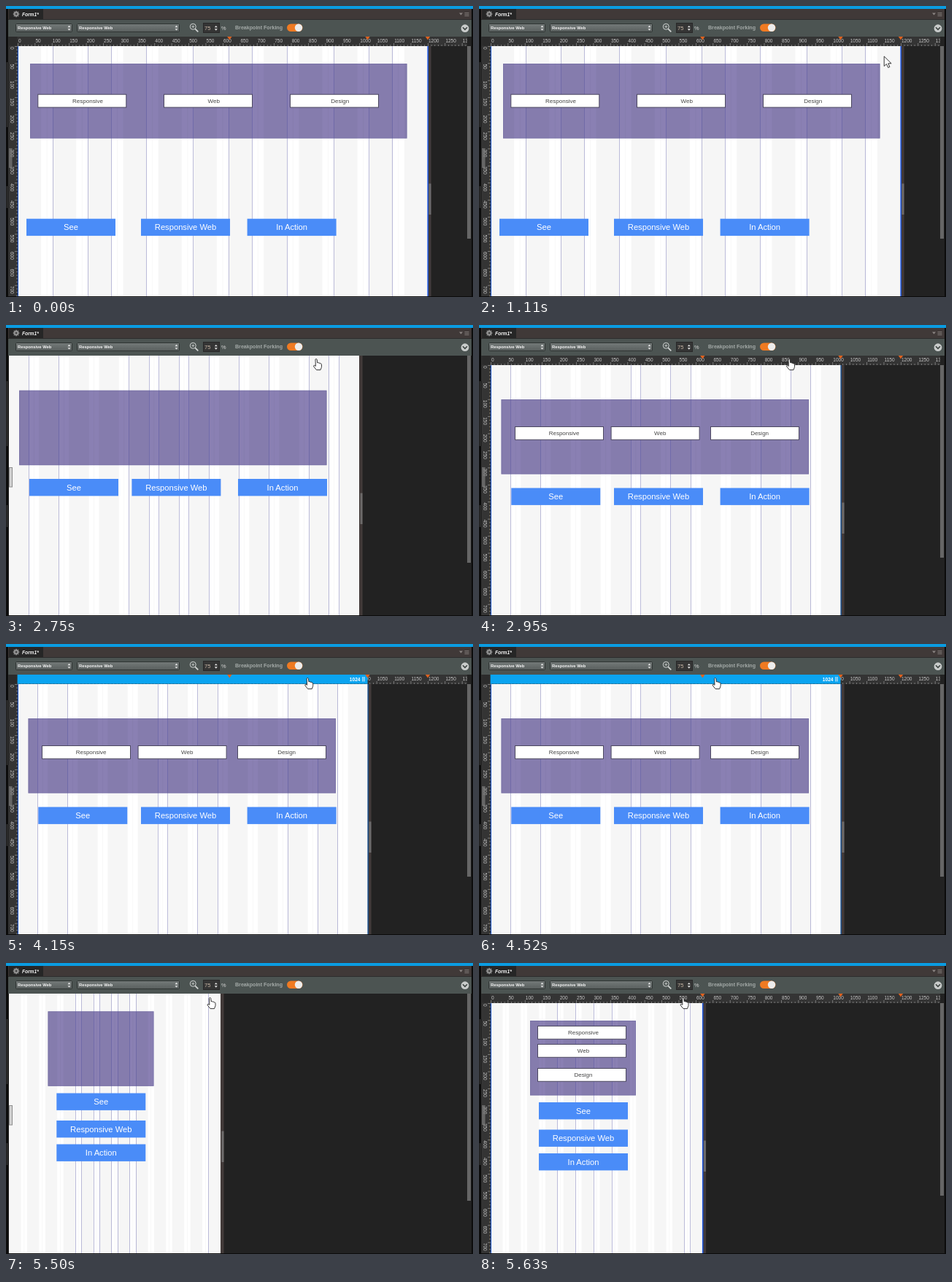
Recreate the animation shown at these times as an HTML page. Size 640x399 px, loop 6.23 s.

```html
<!DOCTYPE html>
<html lang="en">
<head>
<meta charset="utf-8">
<title>Responsive form designer</title>
<style>
html, body { margin: 0; width: 100%; height: 100%; overflow: hidden; background: #222; }
svg { display: block; width: 100vw; height: 100vh; }
text { font-family: "Liberation Sans", Arial, sans-serif; }
.mid { text-anchor: middle; }
.bold { font-weight: bold; }
.button { font-size: 11.2px; fill: #fff; }
.field { font-size: 8px; fill: #444; }
.ruler text { font-size: 6.5px; fill: #c4c4c4; }
.combo { font-size: 5.8px; fill: #f2f2f2; }
</style>
</head>
<body>
<svg id="stage" viewBox="0 0 640 399"></svg>
<script>
const LOOP = 6230;
const SCALE = 0.4683;
const ORIGIN = { x: 16, y: 55 };
const BREAKPOINTS = [620, 1024, 1200];
const stage = document.getElementById('stage');

const unitX = u => ORIGIN.x + u * SCALE;
const range = n => Array.from({ length: n }, (_, i) => i);
const rect = (x, y, w, h, fill, extra = '') =>
  `<rect x="${x}" y="${y}" width="${w}" height="${h}" fill="${fill}" ${extra}/>`;
const path = (d, fill, extra = '') => `<path d="${d}" fill="${fill}" ${extra}/>`;
const text = (x, y, label, cls, extra = '') =>
  `<text x="${x}" y="${y}" class="${cls}" ${extra}>${label}</text>`;
const group = (id, content, extra = '') => `<g id="${id}" ${extra}>${content}</g>`;

// Up and down arrows of combos and spinners
const arrows = (x, y) =>
  path(`M${x - 2} ${y - 1}h4l-2 -2.4zM${x - 2} ${y + 1}h4l-2 2.4z`, '#e8e8e8');

function combo(x, w) {
  return rect(x + .5, 24.5, w - 1, 11, 'url(#comboFill)', 'rx="1" stroke="#2f3433"')
    + text(x + 3, 32.3, 'Responsive Web', 'combo bold') + arrows(x + w - 4.5, 30.2);
}

function toolbar() {
  const gear = range(8).map(i =>
    rect(13, 6.8, 2, 2, '#8d8d8d', `transform="rotate(${i * 45} 14 11)"`)).join('');
  return rect(0, 0, 640, 399, '#0c0c0c')
    + rect(3, 4, 635, 15, '#403938') + rect(4, 4, 47, 15, '#262626')
    + rect(0, 0, 640, 4, '#0a9ce2')
    + gear + '<circle cx="14" cy="11" r="3" fill="#8d8d8d"/><circle cx="14" cy="11" r="1.1" fill="#262626"/>'
    + text(22, 13.5, 'Form1*', 'bold', 'font-size="6.6" font-style="italic" fill="#f4f4f4"')
    + path('M621 9.5h5l-2.5 3z', '#8c8684')
    + path('M628.5 9.5h6M628.5 11.5h6M628.5 13.5h6', 'none', 'stroke="#8c8684" stroke-width=".8"')
    + rect(3, 18.5, 635, 23.5, '#4c5452') + rect(3, 18, 635, 1, '#2d2d2d')
    + combo(13, 78) + combo(97, 141)
    + '<circle cx="256.3" cy="28.3" r="4" fill="none" stroke="#d3d6d5"/>'
    + path('M259.3 31.3l4 4', 'none', 'stroke="#d3d6d5" stroke-width="1.7"')
    + path('M254.3 28.3h4M256.3 26.3v4', 'none', 'stroke="#d3d6d5" stroke-width=".8"')
    + rect(270.5, 23.5, 22, 13, '#353535', 'stroke="#282828"')
    + text(272, 32.7, '75', '', 'font-size="7.6" fill="#c9b7a6"') + arrows(287.8, 30.3)
    + text(295, 32.7, '%', '', 'font-size="7.4" fill="#d5d5d5"')
    + text(314, 32.4, 'Breakpoint Forking', 'bold', 'font-size="7.1" fill="#a4aaa8"')
    + rect(385, 24.5, 21.5, 10.6, '#ef7a22', 'rx="5.3"')
    + '<circle cx="401" cy="29.8" r="5.2" fill="#ececec"/>'
    + '<circle cx="629" cy="30.7" r="5.4" fill="#c9cccb"/>'
    + path('M626 29.3l3 3l3 -3', 'none', 'stroke="#3c4341" stroke-width="1.6"')
    + rect(1, 77, 1, 89, '#4a4a4a') + rect(1, 247, 1, 30, '#4a4a4a');
}

// Twelve columns with gutters of half a column; only some edges carry a line
function grid(x, y, width, leftLines, rightLines) {
  const pitch = width / (12 - 1 / 3), col = pitch * 2 / 3, h = 398 - y;
  const line = at => rect(Math.floor(at), y, 1, h, '#4a4a9c', 'opacity=".36"');
  return range(12).map(k => rect(x + pitch * k, y, col, h, '#000', 'opacity=".036"')
      + (k < 11 ? rect(x + pitch * k + col + pitch / 6 - .5, y, 1, h, '#000', 'opacity=".03"') : '')).join('')
    + leftLines.map(k => line(x + pitch * k)).join('')
    + rightLines.map(k => line(x + pitch * k + col)).join('');
}

function button([x, y], label) {
  return rect(x, y, 122, 23.4, '#4a8cf8') + text(x + 61, y + 15.6, label, 'button mid');
}

function field([x, y], label, shift) {
  return rect(x + .5, y + .5, 121, 17.8, '#fff', 'stroke="#4c4860"')
    + text(x + 61 + shift, y + 11.9, label, 'field mid');
}

function view(id, v) {
  const { x, y } = v.ruled ? ORIGIN : { x: 4, y: 42 };
  const end = x + v.width, [bx, by, bw] = v.box;
  const edges = v.ruled
    ? rect(15.6, y, 1.4, 343, '#1f55c4') + rect(end - .6, y, 1.6, 343, v.edge) : '';
  return group(id,
    rect(3, 42, 635, 356, '#222')
    + rect(x, y, v.width, 398 - y, '#fff')
    + rect(bx, by, bw, 102.5, '#8a80b3')
    + grid(x, y, v.width, v.left, v.right)
    + rect(bx + .5, by + .5, bw - 1, 101.5, 'none', 'stroke="#6f68a0" stroke-opacity=".5"')
    + (v.fields || []).map((p, i) => field(p, ['Responsive', 'Web', 'Design'][i], v.shift)).join('')
    + v.buttons.map((p, i) => button(p, ['See', 'Responsive Web', 'In Action'][i])).join('')
    + rect(end, y, 4.6, 398 - y, '#423a39') + edges
    + rect(end + 1.5, y + 188.5, 3, 42.5, '#6c6a6a')
    + rect(632, y, 5, v.ruled ? 264 : 284, '#666')
    + (v.ruled ? '' : rect(4.5, 195.5, 4, 26.5, '#d2d2d2', 'stroke="#8f8f8f"')));
}

function ticks(count, draw) {
  return range(count).map(i => draw(i * 10, i % 5 === 0)).join('');
}

function rulers() {
  const across = ticks(132, (u, major) => {
    const x = unitX(u);
    return rect(x, major ? 51 : 53, .8, major ? 4 : 2, '#8b8b8b')
      + (major ? text(x + 1, 49.6, u, '') : '');
  });
  const down = ticks(74, (u, major) => {
    const y = ORIGIN.y + u * SCALE;
    return rect(major ? 12 : 14, y, major ? 4 : 2, .8, '#8b8b8b')
      + (major ? text(0, 0, u, '', `transform="translate(5.8 ${y + 1}) rotate(90)"`) : '');
  });
  return group('rulers',
    rect(3, 42, 629, 13, '#343434') + rect(3, 55, 12.6, 343, '#343434')
    + `<g clip-path="url(#acrossClip)">${across}</g><g clip-path="url(#downClip)">${down}</g>`
    + rect(4, 42, 11.5, 12.5, '#2b2b2b')
    + rect(4, 195, 4.5, 27, '#777', 'opacity=".75"'), 'class="ruler"');
}

function bar(mark) {
  const end = unitX(mark);
  return group('bar' + mark,
    rect(15.6, 42, end - 15.6, 12.6, '#0ba4f0')
    + text(end - 10, 50.8, mark, 'bold', 'font-size="6.6" fill="#fff" text-anchor="end"')
    + rect(end - 7.4, 45, 1.4, 6.5, '#a9defa') + rect(end - 5.2, 45, 1.4, 6.5, '#a9defa'));
}

const markers = group('markers', BREAKPOINTS.map(u =>
  path(`M${unitX(u) - 3.2} 42h6.4l-3.2 4.6z`, '#e0621f')).join(''));

const outline = 'stroke="#222" stroke-width=".9" stroke-linejoin="round"';
const hand = group('hand', path('M3 1.5C3 .2 5 .2 5.2 1.5L5.8 6C6.5 5.2 7.8 5.4 8 6.5C8.8 5.8 9.9 6.2 10 7.2'
  + 'C10.8 6.8 11.5 7.4 11.5 8.3V11.5L10 15.6H4.5L.8 11C0 9.5 1.5 8.8 2.6 9.8L3.4 10.4Z', '#fff', outline));
const arrow = group('arrow', path('M.5 .5V14L3.7 11L6 16L8.2 15L6 10.3H10.4Z', '#fff', outline));

const wideButtons = [[28, 291.7], [185, 291.7], [330.6, 291.7]];
const VIEWS = {
  wide: { until: 2750, ruled: true, width: 562, edge: '#1f55d8', box: [33, 79, 516.5],
    left: [1, 2, 5, 6, 9, 10], right: [2, 3, 6, 7, 10],
    fields: [[43.3, 120.7], [216, 120.7], [389, 120.7]], shift: 7.7, buttons: wideButtons },
  mediumPreview: { until: 2950, width: 480, box: [18, 89.7, 421.5],
    left: [4, 5, 6, 10, 11], right: [0, 1, 4, 5, 6, 7, 8, 10],
    buttons: [[32, 211], [172.4, 211], [318, 211]] },
  medium: { until: 5500, ruled: true, width: 480, edge: '#1c4d86', box: [30.5, 102, 421.5],
    left: [5, 6, 9, 10], right: [0, 1, 4, 6, 10],
    fields: [[49, 139], [180.6, 139], [317, 139]], shift: 6.6,
    buttons: [[44.3, 223.5], [185, 223.5], [330.6, 223.5]] },
  narrowPreview: { until: 5630, width: 290, box: [57.5, 66.3, 145],
    left: [4, 5, 6, 7, 11], right: [3, 4, 5, 6],
    buttons: [[69.3, 178.5], [69.3, 216], [69.3, 248.5]] },
  narrow: { until: LOOP, ruled: true, width: 290.5, edge: '#1f55d8', box: [70, 79, 145],
    left: [11], right: [3, 4, 5, 6, 10],
    fields: [[80, 86], [80, 111], [80, 144]], shift: 2,
    buttons: [[82, 191], [82, 228.5], [82, 261]] }
};

stage.innerHTML = `<defs>
  <linearGradient id="comboFill" x2="0" y2="1"><stop stop-color="#747a79"/><stop offset="1" stop-color="#595f5e"/></linearGradient>
  <clipPath id="acrossClip"><rect x="16" y="42" width="616" height="13"/></clipPath>
  <clipPath id="downClip"><rect x="4" y="55" width="12" height="343"/></clipPath></defs>`
  + toolbar() + Object.entries(VIEWS).map(([id, v]) => view(id, v)).join('')
  + rulers() + BREAKPOINTS.map(bar).join('') + markers + arrow + hand;

const show = (id, on) => { document.getElementById(id).style.display = on ? '' : 'none'; };

// Pointer moves: start, end, number of steps, destination
const MOVES = [
  [930, 1230, 6, 500, 55], [1430, 1490, 2, 496, 46], [1690, 1750, 2, 421, 46],
  [4150, 4580, 7, 299, 46], [4780, 4900, 3, 275.5, 47]
];

function pointerAt(t) {
  let x = 642, y = 90;
  for (const [from, to, steps, toX, toY] of MOVES) {
    if (t < from) break;
    const step = Math.min(steps, 1 + Math.floor((t - from) / (to - from) * (steps - 1) + 1e-6));
    const p = (step / steps) ** 1.2;
    x += (toX - x) * p;
    y += (toY - y) * p;
  }
  return [x, y];
}

function highlightAt(t) {
  if (t >= 1430 && t < 1690) return 1200;
  if ((t >= 1690 && t < 2750) || (t >= 4150 && t < 4580)) return 1024;
  return t >= 4580 && t < 5500 ? 620 : 0;
}

function render(now) {
  const t = now % LOOP;
  const current = Object.keys(VIEWS).find(id => t < VIEWS[id].until);
  const { ruled } = VIEWS[current];
  const mark = highlightAt(t);
  Object.keys(VIEWS).forEach(id => show(id, id === current));
  show('rulers', ruled);
  show('markers', ruled);
  BREAKPOINTS.forEach(u => show('bar' + u, u === mark));
  show('arrow', t >= 930 && t < 1430);
  show('hand', t >= 1430);
  const place = `translate(${pointerAt(t).join(' ')})`;
  document.getElementById('arrow').setAttribute('transform', place);
  document.getElementById('hand').setAttribute('transform', place);
}

function tick(now) {
  render(now);
  requestAnimationFrame(tick);
}
render(0);
requestAnimationFrame(tick);
</script>
</body>
</html>
```
